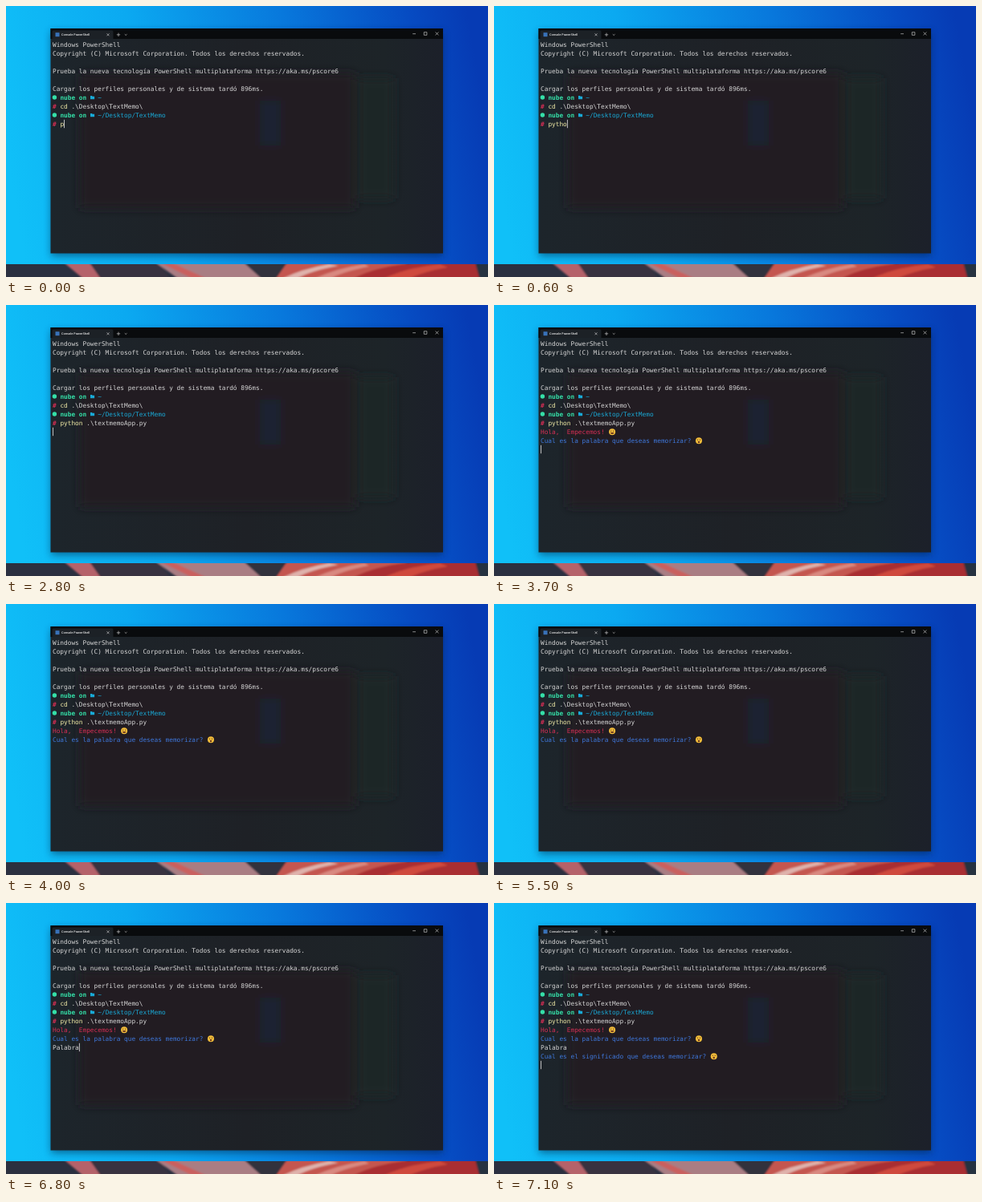
Recreate the animation shown at these times as an HTML page. Size 600 by 338 pixels, loop 8 s.

```html
<!DOCTYPE html>
<html lang="es">
<head>
<meta charset="utf-8">
<title>Terminal</title>
<style>
  html, body { margin: 0; width: 100%; height: 100%; overflow: hidden; background: #0a84e0; }
  svg { display: block; width: 600px; height: 338px; }
  text { white-space: pre; text-rendering: geometricPrecision; }
  #screen text { font: 7.79px "DejaVu Sans Mono", monospace; fill: #d6d6d6; }
  #screen .bold { font-weight: bold; }
  .title { font: 600 3.75px "Open Sans", sans-serif; fill: #f2f2f2; }
  .glyph { fill: none; stroke: #d0d0d0; stroke-width: .65; }
</style>
</head>
<body>
<svg viewBox="0 0 600 338">
  <defs>
    <linearGradient id="sky" x1="0" y1=".55" x2="1" y2=".45">
      <stop offset="0" stop-color="#10c0f8"/>
      <stop offset=".3" stop-color="#0ba9f1"/>
      <stop offset=".62" stop-color="#0878dc"/>
      <stop offset=".88" stop-color="#064bc2"/>
      <stop offset="1" stop-color="#063bb4"/>
    </linearGradient>
    <linearGradient id="glass">
      <stop offset="0" stop-color="#1d252b"/>
      <stop offset=".5" stop-color="#1e2126"/>
      <stop offset=".85" stop-color="#1d2428"/>
      <stop offset="1" stop-color="#1c202a"/>
    </linearGradient>
    <filter id="shadow" x="-10%" y="-10%" width="120%" height="120%"><feGaussianBlur stdDeviation="5"/></filter>
    <filter id="soft" x="-20%" y="-20%" width="140%" height="140%"><feGaussianBlur stdDeviation="6"/></filter>
    <filter id="smear"><feGaussianBlur stdDeviation=".8"/></filter>
    <clipPath id="strip"><rect y="322" width="600" height="16"/></clipPath>
    <clipPath id="pane"><rect x="56" y="41" width="488" height="267"/></clipPath>
  </defs>

  <rect width="600" height="338" fill="url(#sky)"/>

  <g clip-path="url(#strip)">
    <rect y="322" width="600" height="16" fill="#2b3040"/>
    <g filter="url(#smear)">
      <path d="M72 320H104L118 340H96Z" fill="#b5626a"/>
      <path d="M104 320H190L205 340H118Z" fill="#37333f"/>
      <path d="M186 320H300L322 340H214Z" fill="#a97d83"/>
      <path d="M206 320L250 340H232L192 320Z" fill="#c9605e"/>
      <path d="M296 320H350L338 340H318Z" fill="#30303c"/>
      <path d="M350 320H500L470 340H336Z" fill="#c4564f"/>
      <path d="M344 340Q368 328 402 322L414 324Q380 330 362 340Z" fill="#dfb2ac"/>
      <path d="M384 340Q412 327 446 322L452 325Q420 331 404 340Z" fill="#d98980"/>
      <path d="M432 340Q460 325 510 320H586L596 340Z" fill="#a92f30"/>
      <path d="M470 340Q500 326 540 322L550 326Q520 331 502 340Z" fill="#cf4a3e"/>
      <path d="M584 320H602V342H590Z" fill="#28303f"/>
    </g>
  </g>

  <rect x="56" y="32" width="488" height="280" fill="#001a40" opacity=".5" filter="url(#shadow)" clip-path="none"/>
  <rect x="55.5" y="28" width="488.5" height="280.5" fill="url(#glass)"/>
  <g clip-path="url(#pane)">
    <g filter="url(#soft)">
      <rect x="92" y="84" width="342" height="168" fill="#231f22"/>
      <rect x="316" y="118" width="26" height="56" fill="#1c2230"/>
      <rect x="438" y="90" width="44" height="150" fill="#1c2627"/>
    </g>
  </g>

  <rect x="55.5" y="28" width="488.5" height="13" fill="#090b0d"/>
  <path d="M57.5 41V32Q57.5 30.5 59 30.5H132Q133.5 30.5 133.5 32V41Z" fill="#1c2126"/>
  <rect x="61.5" y="33.2" width="5" height="5" fill="#3972b8"/>
  <text class="title" x="69" y="37.4">Console PowerShell</text>
  <path class="glyph" d="M125.5 34.3l3 3m0-3l-3 3M137.8 35.8h4.4m-2.2-2.2v4.4M147.8 35.2l1.4 1.3 1.4-1.3
    M506.2 34.7h3.8M520.3 32.7h3.6v3.6h-3.6ZM534.6 32.6l3.8 3.8m0-3.8l-3.8 3.8"/>

  <g id="screen"></g>
</svg>

<script>
const LOOP = 8000, LEFT = 58, CELL = 4.69, FIRST_ROW = 48, ROW = 11;
const TEAL = '#35e0a8', CYAN = '#19a9d6', RED = '#d62f55', YELLOW = '#f3eda8', BLUE = '#3f78dc';
const screenGroup = document.getElementById('screen');
const columnX = column => LEFT + column * CELL;
const rowY = row => FIRST_ROW + row * ROW;

function add(tag, attributes, parent = screenGroup) {
  const node = document.createElementNS('http://www.w3.org/2000/svg', tag);
  for (const name in attributes) node.setAttribute(name, attributes[name]);
  return parent.appendChild(node);
}

function write(row, column, string, color, parent, bold) {
  const node = add('text', { x: columnX(column), y: rowY(row) + 2.9 }, parent);
  if (color) node.style.fill = color;
  if (bold) node.setAttribute('class', 'bold');
  node.textContent = string;
  return node;
}

function prompt(row, path) {
  add('circle', { cx: 60.4, cy: rowY(row), r: 2.7, fill: TEAL });
  write(row, 2, 'nube on', TEAL, screenGroup, true);
  const y = rowY(row);
  add('path', { d: `M105 ${y - 2.1}h2l.7.8h2.4v3.6h-5.1Z`, fill: CYAN });
  write(row, 12, path, CYAN);
  write(row + 1, 0, '#', RED, screenGroup, true);
}

function face(row, column, mouth, parent) {
  const g = add('g', { transform: `translate(${columnX(column + 1)} ${rowY(row) + .3})` }, parent);
  add('circle', { r: 4, fill: '#f3bd3a' }, g);
  add('path', { d: 'M-2.1-1.1h1.2M.9-1.1h1.2', stroke: '#4b3420', 'stroke-width': 1 }, g);
  add('path', { d: mouth, fill: '#6b3a20' }, g);
}

const GRIN = 'M-2.3.6H2.3Q1.7 2.8 0 2.8T-2.3.6Z';
const OPEN = 'M-1.2 1.7a1.2 1.2 0 1 1 2.4 0a1.2 1.2 0 1 1-2.4 0Z';

write(0, 0, 'Windows PowerShell');
write(1, 0, 'Copyright (C) Microsoft Corporation. Todos los derechos reservados.');
write(3, 0, 'Prueba la nueva tecnología PowerShell multiplataforma https://aka.ms/pscore6');
write(5, 0, 'Cargar los perfiles personales y de sistema tardó 896ms.');
prompt(6, '~');
write(7, 2, 'cd', YELLOW);
write(7, 5, '.\\Desktop\\TextMemo\\');
prompt(8, '~/Desktop/TextMemo');

const command = write(9, 2, '', YELLOW);
const argument = write(9, 9, '');

const greeting = add('g', {});
write(10, 0, 'Hola,  Empecemos!', RED, greeting);
face(10, 18, GRIN, greeting);
write(11, 0, 'Cual es la palabra que deseas memorizar?', BLUE, greeting);
face(11, 41, OPEN, greeting);

const answer = write(12, 0, '');
const followUp = add('g', {});
write(13, 0, 'Cual es el significado que deseas memorizar?', BLUE, followUp);
face(13, 45, OPEN, followUp);

const cursor = add('rect', { width: .8, height: 10.4, fill: '#e8e8e8' });

// Each entry is [start time, value]; a value holds until the next entry.
const typedCommand = [
  [0, 'p'], [300, 'py'], [400, 'pyt'], [500, 'pyth'], [600, 'pytho'], [700, 'python'],
  [800, 'python '], [1100, 'python T'], [1200, 'python TE'], [1600, 'python .\\textmemoApp.py']
];
const typedAnswer = [
  [0, ''], [6100, 'P'], [6400, 'Pa'], [6500, 'Pal'], [6600, 'Pala'], [6700, 'Palabr'], [6800, 'Palabra']
];
const cursorRow = [[0, 9], [2000, 10], [3700, 12], [7000, 14]];
const cursorOn = [
  [0, true], [2000, false], [2800, true], [3400, false], [3700, true], [4000, false],
  [4500, true], [5500, false], [6000, true]
];
const valueAt = (track, time) => track.findLast(([start]) => start <= time)[1];
const show = (node, visible) => node.setAttribute('visibility', visible ? 'visible' : 'hidden');

function draw(time) {
  const line = valueAt(typedCommand, time), reply = valueAt(typedAnswer, time);
  const row = valueAt(cursorRow, time);
  command.textContent = line.slice(0, 6);
  argument.textContent = line.slice(7);
  answer.textContent = reply;
  show(greeting, time >= 3700);
  show(followUp, time >= 7000);

  const column = row === 9 ? line.length + 2 : row === 12 ? reply.length : 0;
  cursor.setAttribute('x', columnX(column) + .1);
  cursor.setAttribute('y', rowY(row) - 5.2);
  show(cursor, valueAt(cursorOn, time));
}

const began = performance.now();
function frame() {
  draw((performance.now() - began) % LOOP);
  requestAnimationFrame(frame);
}
frame();
</script>
</body>
</html>
```
